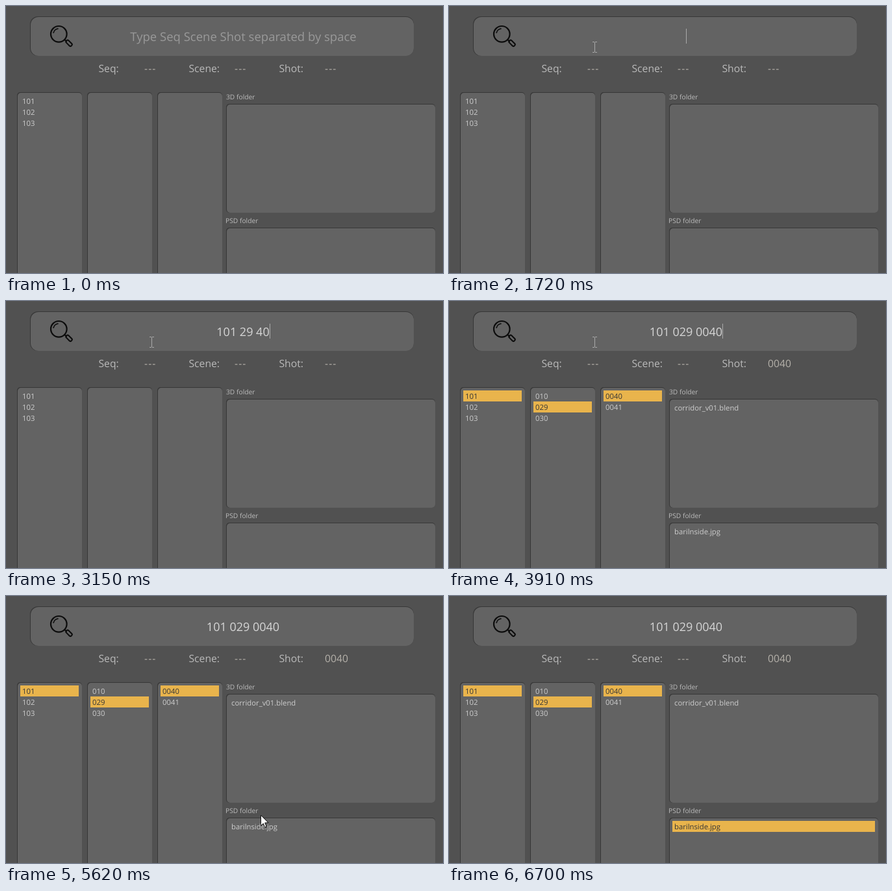
An HTML page with a canvas that plays this animation: 673 px wide and 412 px high, repeating every 6.87 s.

```html
<!DOCTYPE html>
<html lang="en">
<head>
<meta charset="utf-8">
<title>Shot search</title>
<style>
  html, body { margin: 0; width: 100%; height: 100%; overflow: hidden; background: #515151; }
  canvas { display: block; }
</style>
</head>
<body>
<canvas id="stage" width="673" height="412"></canvas>
<script>
const ctx = document.getElementById('stage').getContext('2d');
const LOOP = 6870;
const FONT = '"Open Sans", "Noto Sans", sans-serif';
const AMBER = '#e9b44c';
const FOUND = 3910, PICKED = 5920, BLURRED = 6700;

// [start time, value]
const typing = [
  [0, ''], [1870, '1'], [2020, '10'], [2340, '101'], [2500, '101 '], [2660, '101 2'],
  [2830, '101 29'], [2990, '101 29 4'], [3150, '101 29 40'], [FOUND, '101 029 0040']
];
const caret = [[0, false], [620, true], [1250, false], [1720, true], [4380, false], [5010, true], [5470, false]];

// [start time, shape, x, y, pressed]
const pointer = [
  [0, null],
  [140, arrow, 80, 104],
  [300, arrow, 150, 80],
  [470, beam, 224, 63],
  [620, beam, 224, 63, true],
  [780, beam, 224, 63],
  [5160, arrow, 238, 86],
  [5310, arrow, 296, 182],
  [5470, arrow, 368, 299],
  [5620, arrow, 392, 338],
  [5770, arrow, 389, 348],
  [PICKED, arrow, 389, 348, true],
  [6090, arrow, 389, 348],
  [6240, null]
];

const at = (track, t) => track.findLast(step => step[0] <= t);

function text(str, x, y, size, color, align = 'left') {
  ctx.font = `${size}px ${FONT}`;
  ctx.textAlign = align;
  ctx.fillStyle = color;
  ctx.fillText(str, x, y);
}

function rounded(x, y, w, h, r, color) {
  ctx.fillStyle = color;
  ctx.beginPath();
  ctx.roundRect(x, y, w, h, r);
  ctx.fill();
}

function panel(x, y, w, h, r) {
  rounded(x, y, w, h, r, '#373737');
  rounded(x + 1, y + 1, w - 1, h - 1, r, '#636363');
}

function row(str, x, y, width, selected) {
  if (selected) {
    ctx.fillStyle = AMBER;
    ctx.fillRect(x - 3, y - 13, width, 17);
  }
  text(str, x, y, 11.3, selected ? '#363636' : '#cdcdcd');
}

function list(x, items, selected) {
  panel(x, 133, 100, 300, 5);
  items.forEach((item, i) => row(item, x + 8, 151 + i * 17, 90, item === selected));
}

function field(label, x, value, valueX) {
  text(label, x, 102, 15.7, '#bababa');
  ctx.letterSpacing = value === '---' ? '1.1px' : '0px';
  text(value, valueX, 102, 15.7, '#b5b1aa');
  ctx.letterSpacing = '0px';
}

function magnifier() {
  ctx.strokeStyle = '#0c0c0c';
  ctx.lineCap = 'round';
  ctx.lineWidth = 2.2;
  ctx.beginPath();
  ctx.arc(81.3, 43.3, 12.3, 0, Math.PI * 2);
  ctx.moveTo(90.3, 52);
  ctx.lineTo(93, 54.5);
  ctx.stroke();
  ctx.lineWidth = 1.6;
  ctx.beginPath();
  ctx.arc(81.3, 43.3, 8.4, Math.PI * 1.08, Math.PI * 1.45);
  ctx.stroke();
  ctx.save();
  ctx.translate(97, 57.3);
  ctx.rotate(Math.PI / 4);
  ctx.lineWidth = 2;
  ctx.beginPath();
  ctx.roundRect(-5.3, -2.4, 10.8, 4.8, 2);
  ctx.stroke();
  ctx.restore();
}

function arrow(x, y) {
  ctx.save();
  ctx.translate(x + 0.5, y + 0.5);
  ctx.beginPath();
  [[0, 0], [0, 16], [3.7, 12.5], [6.3, 18.3], [8.6, 17.3], [6.2, 11.5], [11.2, 11.3]]
    .forEach(([px, py]) => ctx.lineTo(px, py));
  ctx.closePath();
  ctx.fillStyle = '#fff';
  ctx.strokeStyle = '#111';
  ctx.lineWidth = 1;
  ctx.fill();
  ctx.stroke();
  ctx.restore();
}

function beam(x, y) {
  ctx.fillStyle = '#aaa';
  ctx.fillRect(x, y - 7, 1, 15);
  for (const edge of [y - 8, y + 8]) {
    ctx.fillRect(x - 3, edge, 3, 1);
    ctx.fillRect(x + 1, edge, 3, 1);
  }
}

function drawSearch(t) {
  panel(37, 16, 591, 61, 12);
  magnifier();
  const query = at(typing, t)[1];
  if (t < 620) text('Type Seq Scene Shot separated by space', 365.5, 54, 18.5, '#999', 'center');
  text(query, 365, 54, 18, '#d6d6d6', 'center');
  if (at(caret, t)[1]) {
    ctx.font = `18px ${FONT}`;
    ctx.fillStyle = '#aaa';
    ctx.fillRect(Math.round(365 + ctx.measureText(query).width / 2), 35, 1, 23);
  }
}

function drawFiles(t, found) {
  text('3D folder', 339, 144, 10.25, '#bcbcbc');
  panel(339, 151, 322, 168, 5);
  text('PSD folder', 338, 335, 10.25, '#bcbcbc');
  panel(339, 342, 322, 100, 5);
  if (!found) return;
  row('corridor_v01.blend', 347, 169, 312, false);
  row('barilnside.jpg', 347, 360, 312, t >= PICKED);
  if (t >= PICKED && t < BLURRED) {
    ctx.strokeStyle = '#3b3528';
    ctx.lineWidth = 1;
    ctx.lineCap = 'butt';
    ctx.setLineDash([1, 1]);
    ctx.strokeRect(345.5, 347.5, 310, 16);
    ctx.setLineDash([]);
  }
}

function drawPointer(t) {
  const [, shape, x, y, pressed] = at(pointer, t);
  if (!shape) return;
  if (pressed) {
    ctx.fillStyle = 'rgba(220, 215, 20, 0.6)';
    ctx.beginPath();
    ctx.arc(x - 1, y, 12, 0, Math.PI * 2);
    ctx.fill();
  }
  shape(x, y);
}

function draw(t) {
  const found = t >= FOUND;
  ctx.textRendering = 'geometricPrecision';
  ctx.fillStyle = '#515151';
  ctx.fillRect(0, 0, 673, 412);
  drawSearch(t);
  field('Seq:', 142.5, '---', 213);
  field('Scene:', 281.5, '---', 352);
  field('Shot:', 420.5, found ? '0040' : '---', 491);
  list(17, ['101', '102', '103'], found && '101');
  list(125, found ? ['010', '029', '030'] : [], '029');
  list(233, found ? ['0040', '0041'] : [], '0040');
  drawFiles(t, found);
  drawPointer(t);
}

const start = performance.now();
function tick() {
  draw((performance.now() - start) % LOOP);
  requestAnimationFrame(tick);
}
tick();
</script>
</body>
</html>
```
